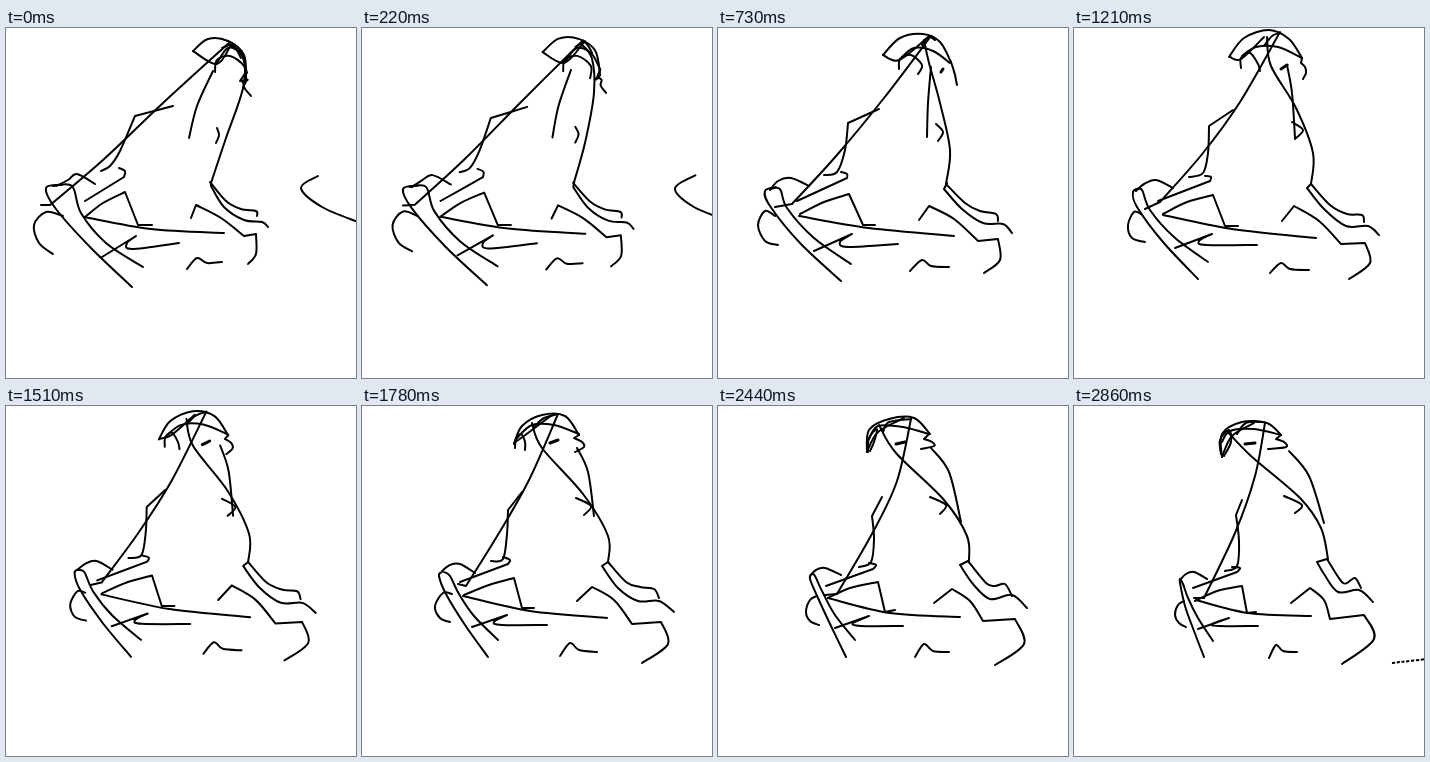
These frames come from a looping animation (350x350 px, 2890 ms). An HTML page with a canvas:

```html
<!DOCTYPE html>
<html lang="en">
<head>
<meta charset="utf-8">
<title>Turning line figure</title>
<style>
  html, body { margin: 0; width: 100%; height: 100%; overflow: hidden; background: #fff; }
  canvas { display: block; width: 350px; height: 350px; }
</style>
</head>
<body>
<canvas id="stage" width="350" height="350"></canvas>
<script>
const LOOP = 2890, FIRST = 70, STEP = 30;
const KEYS = [0, 23, 39, 58, 80, 94]; // steps at which the poses are set
const ctx = document.getElementById('stage').getContext('2d');
const strokes = [];

// Each pose lists the points a stroke passes through; corners are point indices.
function stroke(corners, poses, { keys = KEYS, width = 2, dash = [] } = {}) {
  const parsed = poses.map(p => p.split(' ').map(xy => xy.split(',').map(Number)));
  strokes.push({ corners, poses: parsed, keys, width, dash });
}

// Arm from head to hand
stroke([3], [
  '224,14 157,75 97,132 44,177 35,177',
  '213,8 166,70 119,127 74,176 57,179',
  '206,4 166,74 129,125 86,174 71,181',
  '196,8 167,74 137,127 104,180 96,178',
  '193,13 179,75 155,126 119,188 107,189',
  '191,17 181,70 161,127 130,192 120,192']);
// Back
stroke([], [
  '222,16 237,28 237,60 220,110 205,155',
  '206,12 211,35 222,75 232,122 228,156',
  '193,9 197,38 222,80 239,125 237,156',
  '170,17 180,42 221,88 246,130 246,156',
  '161,19 178,47 226,94 249,130 251,155',
  '153,25 177,50 226,92 247,122 254,153']);
// Shoulder
stroke([], [
  '207,43 191,78 183,110', '213,39 210,75 209,109', '213,37 218,65 221,110',
  '215,42 226,66 232,110', '213,42 231,66 243,116', '215,45 235,70 250,117']);
// Elbow
stroke([], [
  '211,100 213,107 210,115', '218,96 225,104 220,113', '218,94 229,102 221,111',
  '214,92 229,100 222,109', '212,91 228,99 222,108', '210,90 228,99 221,107']);
// Chest and knee
stroke([1], [
  '167,78 129,88 114,123 104,138 95,143',
  '161,81 130,95 127,122 119,144 106,147',
  '159,82 135,98 134,125 129,145 115,149',
  '160,86 146,104 145,128 141,153 129,155',
  '164,91 154,110 156,133 153,156 141,161',
  '168,94 162,109 165,135 163,160 151,165']);
// Forearm
stroke([1], [
  '79,173 118,149 119,143 113,140',
  '79,173 129,150 129,146 123,144',
  '84,173 136,153 137,149 131,148',
  '98,176 146,158 148,154 141,151',
  '108,180 155,163 158,159 151,157',
  '119,182 163,166 166,162 158,161']);
// Hand
stroke([], [
  '50,158 62,152 71,146 89,156', '52,162 60,153 73,150 91,158',
  '62,163 70,156 82,152 99,160', '80,165 88,159 98,158 113,167',
  '92,170 98,164 107,162 123,169', '106,174 112,168 120,166 133,173']);
// Outer and inner shin
stroke([], [
  '56,157 40,160 50,181 85,220 126,259',
  '58,159 47,163 52,178 82,215 123,253',
  '66,160 59,164 63,179 89,214 124,251',
  '80,166 77,170 84,188 103,219 126,251',
  '94,168 92,173 100,192 113,220 128,251',
  '106,173 106,177 111,200 120,225 130,251']);
stroke([], [
  '47,158 66,158 75,185 100,215 137,239',
  '52,161 62,161 69,180 96,210 133,236',
  '62,162 68,162 76,182 100,209 134,234',
  '82,166 88,170 97,188 112,210 136,234',
  '94,168 97,170 104,185 117,209 137,234',
  '106,173 109,178 114,192 124,212 139,235']);
// Hip
stroke([], [
  '57,188 40,184 28,197 33,215 47,226',
  '57,188 47,183 40,197 47,213 60,217',
  '67,186 60,184 54,197 58,210 71,214',
  '90,188 81,187 73,200 78,212 88,216',
  '99,190 92,194 88,206 92,215 101,219',
  '110,195 104,199 101,209 105,217 112,221']);
// Base line
stroke([], [
  '78,189 145,201 218,205', '81,188 151,200 236,208', '89,187 158,201 242,210',
  '101,190 168,205 245,212', '110,192 172,207 242,211', '122,194 174,207 237,210']);
// Foot wedge
stroke([2, 3], [
  '79,189 97,175 119,164 132,197 146,197',
  '82,186 106,174 131,166 145,197 157,197',
  '89,186 113,174 139,167 151,198 164,198',
  '102,189 127,179 152,172 160,202 172,202',
  '110,192 132,182 160,176 167,206 177,204',
  '121,195 143,185 168,180 173,207 182,206']);
// Toes
stroke([1], [
  '96,229 130,208 121,215 126,221 173,215',
  '96,223 134,206 122,214 130,219 180,216',
  '101,220 138,206 125,213 132,217 183,217',
  '110,221 145,209 132,216 140,219 185,219',
  '117,222 151,210 135,217 143,220 185,220',
  '124,223 155,212 138,218 145,220 184,220']);
// Squiggle
stroke([], [
  '181,241 191,230 201,235 216,234', '192,243 204,232 213,238 231,239',
  '196,245 207,235 216,241 235,242', '198,250 208,237 217,244 235,246',
  '197,251 206,238 215,245 231,246', '195,252 202,239 209,245 223,246']);
// Far leg, upper and lower edge
stroke([], [
  '204,154 220,173 235,181 250,183 251,188',
  '228,156 247,175 262,183 278,186 280,193',
  '237,156 256,177 273,186 288,187 290,194',
  '246,156 264,176 278,181 292,183 297,192',
  '250,155 268,177 277,180 287,178 294,190',
  '253,153 267,175 273,177 281,172 287,182']);
stroke([1], [
  '205,154 205,158 218,179 238,192 256,194 262,199',
  '229,155 226,161 244,181 265,195 285,196 294,205',
  '237,156 233,160 250,181 272,198 294,198 305,207',
  '246,156 240,160 256,182 276,195 297,195 312,206',
  '250,155 242,159 255,178 272,193 294,189 309,202',
  '253,153 243,156 250,168 264,186 285,184 299,196']);
// Far foot
stroke([1, 3, 4], [
  '185,190 190,177 215,190 238,208 250,206 250,226 242,236',
  '201,192 211,178 236,191 260,213 280,211 282,232 266,245',
  '208,193 220,178 245,193 267,216 291,215 296,235 275,251',
  '215,195 230,181 252,194 270,218 299,216 306,238 280,257',
  '216,197 234,183 252,195 265,215 297,213 306,238 277,259',
  '217,197 236,182 250,194 256,213 290,209 300,233 268,258']);
// Hat
stroke([], [
  '187,23 202,11 222,13 238,27 240,53',
  '165,27 182,10 205,6 222,14 233,34',
  '155,29 170,10 195,2 215,11 228,30',
  '152,38 160,20 180,9 203,10 217,29',
  '149,46 151,24 171,13 196,12 212,28',
  '148,51 148,28 168,16 193,17 207,29']);
stroke([], [
  '187,23 211,36 226,15', '165,27 181,32 210,9', '156,29 167,31 190,9',
  '152,37 166,27 190,9', '149,46 160,26 186,12', '148,51 158,30 180,17']);
// Hair
stroke([], [
  '209,44 211,32 224,28 238,38 240,52',
  '181,41 182,31 193,27 204,37 200,46',
  '167,40 167,30 176,25 184,36 186,43',
  '153,42 154,33 159,28 163,36 163,44',
  '150,46 151,32 159,23 156,36 152,45',
  '147,48 146,34 155,24 157,36 150,50']);
// Brim and fold
stroke([], [
  '211,35 222,20 235,26 241,45', '184,29 196,20 215,23 232,35',
  '168,28 182,19 204,19 228,30', '155,32 170,19 192,19 217,28',
  '151,33 160,20 185,21 211,28', '148,36 156,25 180,23 207,29']);
stroke([], [
  '216,20 227,17 235,30', '204,17 211,9 217,12', '190,18 198,8 206,5',
  '173,20 182,12 196,8', '165,26 171,16 193,13', '163,28 172,17 190,16']);
// Face and eye
stroke([1], [
  '240,44 234,53 240,53 238,59 245,68',
  '233,34 235,40 237,47 238,52 239,57',
  '228,30 227,35 231,39 232,45 229,51',
  '217,29 212,32 220,36 222,41 213,46',
  '211,28 206,33 214,36 216,40 203,43',
  '207,29 202,33 210,36 212,41 194,43']);
stroke([], [
  '237,54 241,52', '223,44 225,41', '207,41 213,37',
  '188,37 196,34', '178,38 187,36', '171,38 181,37'], { width: 3 });
// Curve leaving on the right, dashes entering there
stroke([], ['312,148 295,160 316,179 352,194', '394,145 364,162 377,179 405,188'], { keys: [0, 23] });
stroke([], ['378,303 422,290', '342,277 386,268', '318,257 362,252'],
  { keys: [86, 90, 94], dash: [3.2, 1.6] });

// Smooth change of one coordinate through its poses
function along(keys, vals, t) {
  const last = keys.length - 1;
  if (t <= keys[0]) return vals[0];
  if (t >= keys[last]) return vals[last];
  const gap = i => keys[i + 1] - keys[i];
  const rate = i => (vals[i + 1] - vals[i]) / gap(i);
  const inner = i => (gap(i - 1) * rate(i) + gap(i) * rate(i - 1)) / (gap(i - 1) + gap(i));
  const slope = i => {
    if (last === 1) return rate(0);
    if (i === 0) return 1.5 * rate(0) - 0.5 * inner(1);
    if (i === last) return 1.5 * rate(last - 1) - 0.5 * inner(last - 1);
    return inner(i);
  };
  let i = 0;
  while (t > keys[i + 1]) i++;
  const h = gap(i), u = (t - keys[i]) / h, v = 1 - u;
  return v * v * (1 + 2 * u) * vals[i] + u * u * (1 + 2 * v) * vals[i + 1]
    + h * u * v * (v * slope(i) - u * slope(i + 1));
}

function curve(pts) {
  for (let i = 0; i < pts.length - 1; i++) {
    const b = pts[i], c = pts[i + 1], a = pts[i - 1] || b, d = pts[i + 2] || c;
    ctx.bezierCurveTo(
      b[0] + (c[0] - a[0]) / 6, b[1] + (c[1] - a[1]) / 6,
      c[0] - (d[0] - b[0]) / 6, c[1] - (d[1] - b[1]) / 6, c[0], c[1]);
  }
}

function draw(step) {
  ctx.fillStyle = '#fff';
  ctx.fillRect(0, 0, 350, 350);
  ctx.strokeStyle = '#000';
  ctx.lineJoin = 'round';
  for (const { corners, poses, keys, width, dash } of strokes) {
    const pts = poses[0].map((_, i) =>
      [0, 1].map(axis => along(keys, poses.map(p => p[i][axis]), step)));
    ctx.lineWidth = width;
    ctx.lineCap = dash.length ? 'butt' : 'round';
    ctx.setLineDash(dash);
    ctx.beginPath();
    ctx.moveTo(...pts[0]);
    let from = 0;
    for (const to of [...corners, pts.length - 1]) {
      curve(pts.slice(from, to + 1));
      from = to;
    }
    ctx.stroke();
  }
}

const start = performance.now();
function tick() {
  const t = Math.max(0, performance.now() - start) % LOOP;
  draw(t < FIRST ? 0 : 1 + Math.floor((t - FIRST) / STEP));
  requestAnimationFrame(tick);
}
tick();
</script>
</body>
</html>
```
